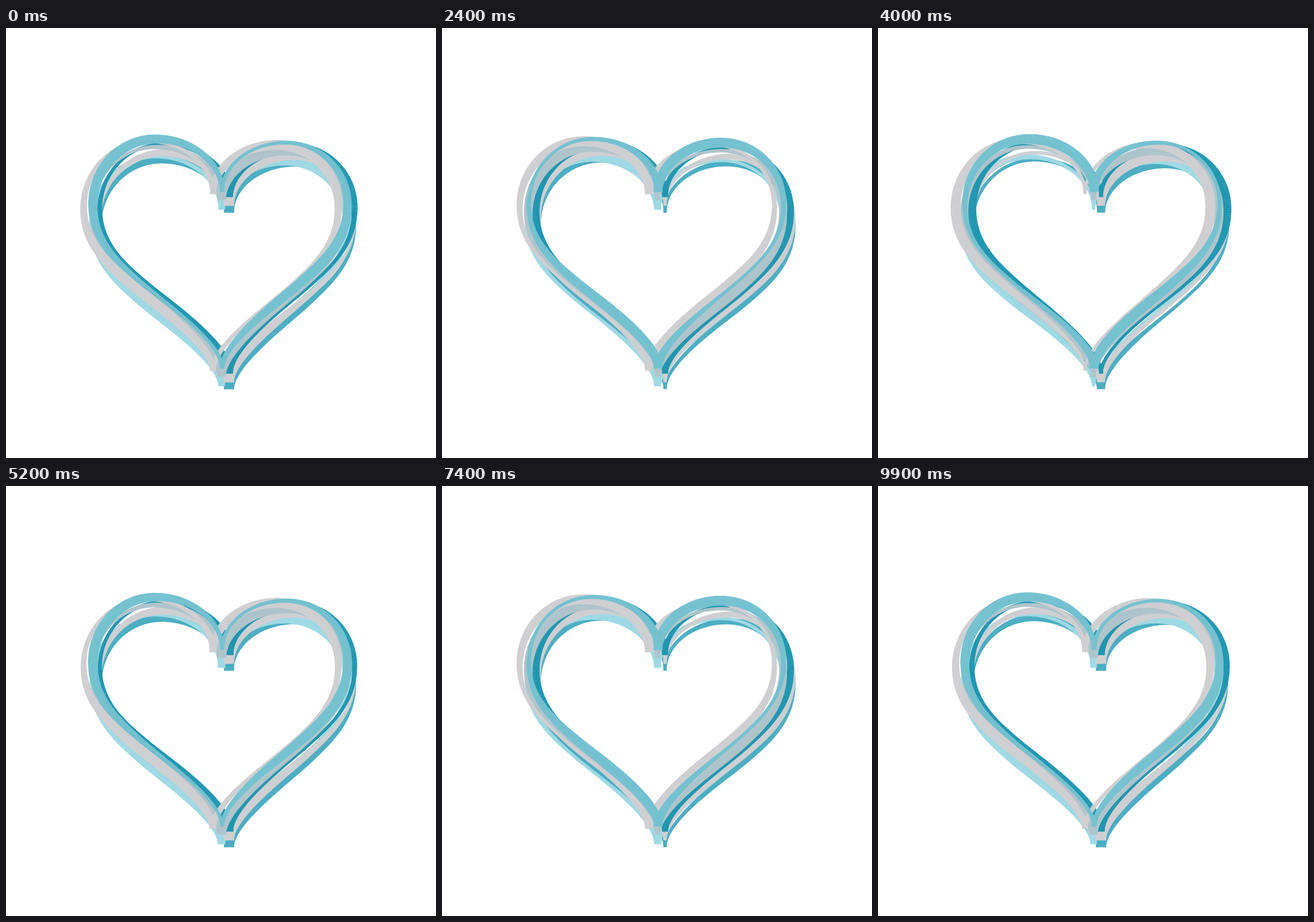
Recreate the animation shown at these times as an HTML page with a canvas. Size 748 by 748 pixels, loop 10 s.

```html
<!DOCTYPE html>
<html>
<head>
<meta charset="utf-8">
<style>
  html, body { margin: 0; width: 100%; height: 100%; overflow: hidden; background: #fff; }
  canvas { display: block; }
</style>
</head>
<body>
<canvas width="748" height="748"></canvas>
<script>
const ctx = document.querySelector('canvas').getContext('2d');
const LOOP = 10000, STEP = 100, TURNS = 2, PIECES = 180;
const GREY = '#cfcfd2';

// Half a heart from cleft to tip, around its own axis
const half = document.createElementNS('http://www.w3.org/2000/svg', 'path');
half.setAttribute('d', 'M0 0C0-50 51-92 114-92S225-40 225 23S181 123 143 156S0 260 0 307');
const length = half.getTotalLength();
const shape = Array.from({ length: PIECES + 1 }, (_, i) => half.getPointAtLength(length * i / PIECES));

// Back to front; thin = where along the left half the stroke is thinnest at the start
const hearts = [
  { color: '#4badc2', x: 388, y: 321, thin: .52 },
  { color: '#9fd9e4', x: 375, y: 316, thin: .25 },
  { color: GREY, x: 388, y: 309, thin: .5 },
  { color: '#2096b0', x: 388, y: 294, thin: .3 },
  { color: '#b0c4cb', x: 375, y: 299, thin: .35 },
  { color: GREY, x: 360, y: 289, thin: .22 },
  { color: '#74c1d0', x: 376, y: 285, thin: .86 }
];

// Separate butt-ended pieces leave the fine ribs on the outside of the bends
function drawHalf(x, y, side, thin) {
  const reach = side < 0 ? -1 : .97, lobe = side < 0 ? 1 : .93;
  const place = p => [x + p.x * reach, y + p.y * (p.y < 0 ? lobe : 1)];
  for (let i = 0; i < PIECES; i++) {
    const [ax, ay] = place(shape[i]), [bx, by] = place(shape[i + 1]);
    const ox = (bx - ax) * .04, oy = (by - ay) * .04;
    const s = (i + .5) / PIECES;
    ctx.lineWidth = 11.5 - 6 * Math.cos(2 * Math.PI * (s - thin));
    ctx.beginPath();
    ctx.moveTo(ax - ox, ay - oy);
    ctx.lineTo(bx + ox, by + oy);
    ctx.stroke();
  }
}

// The wave runs down the left half and back up the right one
function draw(time) {
  ctx.fillStyle = '#fff';
  ctx.fillRect(0, 0, 748, 748);
  for (const { color, x, y, thin } of hearts) {
    const wave = thin + TURNS * time / LOOP;
    ctx.strokeStyle = color;
    drawHalf(x, y, -1, wave);
    drawHalf(x, y, 1, -wave);
  }
}

function frame() {
  draw(Math.floor(performance.now() % LOOP / STEP) * STEP);
  requestAnimationFrame(frame);
}
frame();
</script>
</body>
</html>
```
